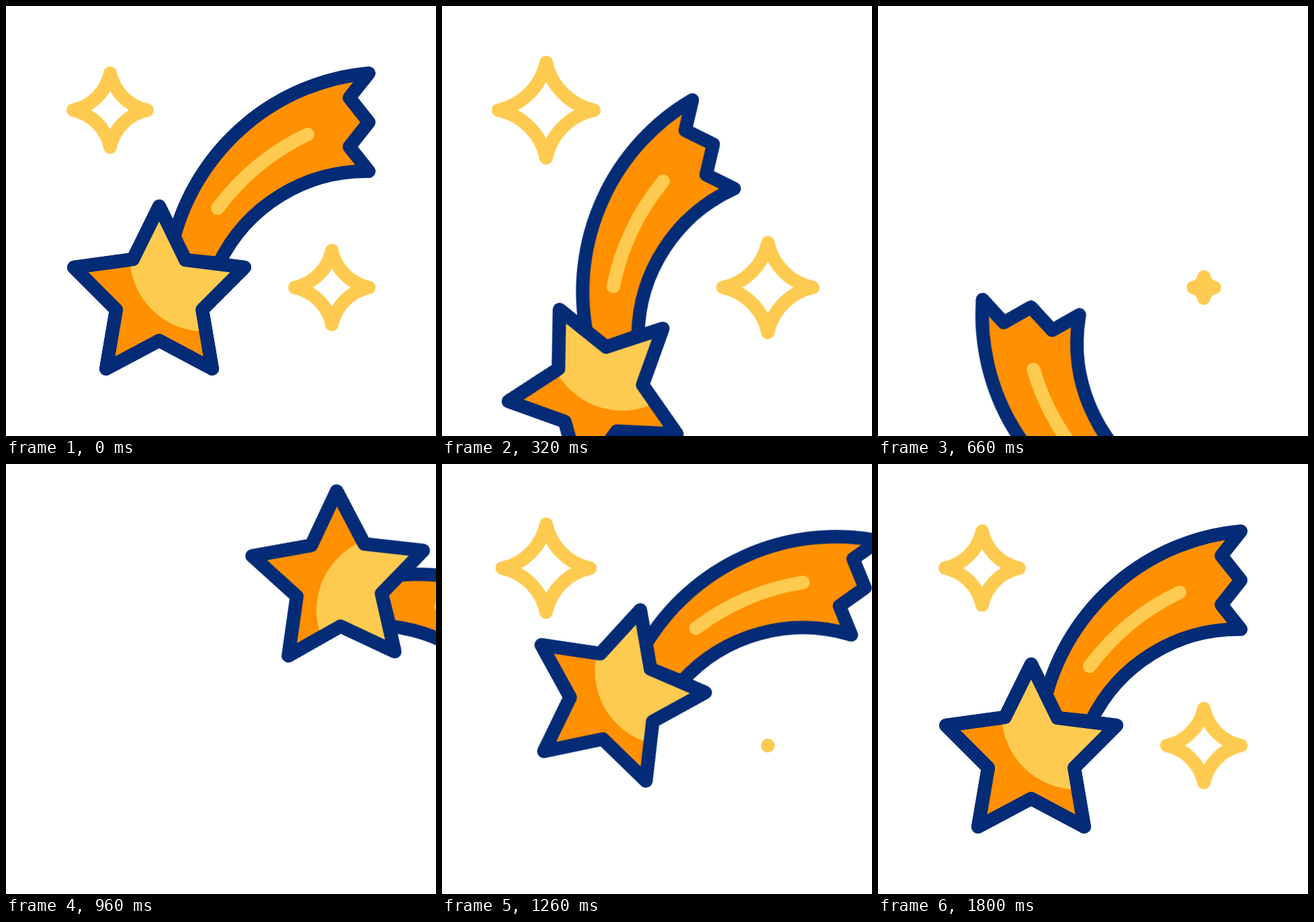
An HTML page for the animation above (2.4 s loop, 640x640 px).

```html
<!DOCTYPE html>
<html lang="en">
<head>
<meta charset="utf-8">
<title>Shooting star</title>
<style>
  html, body { margin: 0; width: 100%; height: 100%; overflow: hidden; background: #fff; }
  svg { display: block; width: 100vw; height: 100vh; }

  :root { --navy: #042b76; --orange: #ff9000; --yellow: #fecb50; }

  path, polygon { stroke-width: 20px; stroke-linecap: round; stroke-linejoin: round; }
  .body { fill: var(--orange); stroke: var(--navy); }
  .edge { fill: none; stroke: var(--navy); }
  .shine { fill: none; stroke: var(--yellow); }
  .glow { fill: var(--yellow); }

  .comet {
    transform-box: view-box;
    transform-origin: 545px 493.4px;
    animation: orbit 2400ms infinite;
  }

  /* Leaves at the bottom, comes back from the right. */
  @keyframes orbit {
    0% { transform: rotate(0deg); animation-timing-function: cubic-bezier(.25, 0, .66, .45); }
    33.333% { transform: rotate(-110deg); animation-timing-function: step-end; }
    33.334% { transform: rotate(110deg); animation-timing-function: cubic-bezier(.326, .55, .716, 1); }
    61.833%, 100% { transform: rotate(0deg); }
  }

  #spark { vector-effect: non-scaling-stroke; }
  .twinkle {
    fill: none;
    stroke: var(--yellow);
    transform-box: view-box;
    transform-origin: 0 0;
    animation: twinkle 2400ms ease-in-out infinite both;
  }
  .late { animation-delay: 200ms; }

  /* Swell, shrink away, pop back and settle; the line keeps its weight. */
  @keyframes twinkle {
    0% { transform: scale(.6875); }
    10.417% { transform: scale(1); }
    23.1%, 43.75% { transform: scale(0); }
    56.25% { transform: scale(1); }
    66.9%, 100% { transform: scale(.6875); }
  }
</style>
</head>
<body>
<svg viewBox="0 0 640 640">
  <defs>
    <polygon id="star" points="228,298 267,378 355,389 292,452 307,540 228,498 149,540 164,452 101,389 189,377"/>
    <clipPath id="inside"><use href="#star"/></clipPath>
    <path id="spark" d="M0-80A104 104 0 0 0 80 0A104 104 0 0 0 0 80A104 104 0 0 0-80 0A104 104 0 0 0 0-80Z"/>
  </defs>

  <g transform="translate(155 155)"><use class="twinkle" href="#spark"/></g>
  <g transform="translate(485 419)"><use class="twinkle late" href="#spark"/></g>

  <g class="comet">
    <path class="body" d="M250 345A331 331 0 0 1 540 100L511 136.500L540 173L511 209.500L540 246A243 243 0 0 0 317 383L267 378Z"/>
    <path class="shine" d="M315 301A360 360 0 0 1 449 191"/>
    <use class="body" href="#star"/>
    <circle class="glow" cx="296" cy="372.500" r="112" clip-path="url(#inside)"/>
    <use class="edge" href="#star"/>
  </g>
</svg>
</body>
</html>
```
